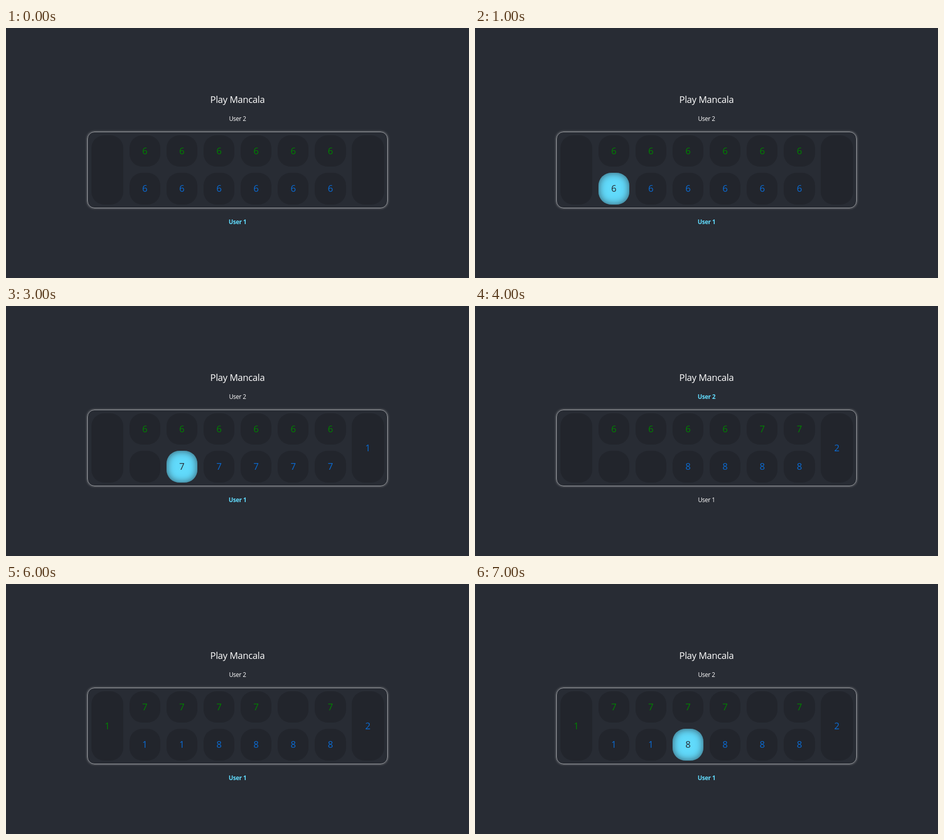
Animation of 900x487 px, one loop 8000 ms. Source, as an HTML page:

```html
<!DOCTYPE html>
<html lang="en">
<head>
<meta charset="utf-8">
<title>Mancala</title>
<style>
  html, body { margin: 0; width: 100%; height: 100%; overflow: hidden; background: #282c34; }
  body { position: relative; font-family: "Open Sans", "Noto Sans", sans-serif; letter-spacing: -.02em; color: #fff; }
  div { position: absolute; box-sizing: border-box; text-align: center; }
  .line { left: 0; width: 900px; height: 30px; line-height: 30px; font-size: 11.7px; }
  #title { top: 123.5px; font-size: 18px; }
  #user2 { top: 160.5px; }
  #user1 { top: 362px; }
  .line.active { color: #61dafb; font-weight: 700; }
  #board {
    left: 158px; top: 201.5px; width: 584px; height: 149.5px;
    border: 1.5px solid #a0a2a6; border-radius: 14px; box-shadow: 0 0 4px #8c8e92;
  }
  .pit { border-radius: 25px; background: #22252c; font-size: 18px; color: #0b6bd3; }
  .pit.top { color: #008000; }
  .pit.picked { background: #61dafb; color: #282c34; box-shadow: inset 0 0 15px rgba(40, 44, 52, .75); }
</style>
</head>
<body>
<div class="line" id="title">Play Mancala</div>
<div class="line" id="user2">User 2</div>
<div id="board"></div>
<div class="line" id="user1">User 1</div>
<script>
const STEP = 1000, STEPS = 8;
const MOVES = [0, 1, 8, 2];
const RIGHT_STORE = 6, LEFT_STORE = 13;

// Pits run counter-clockwise: lower row, right store, upper row, left store.
const pits = Array.from({ length: 14 }, (_, i) => {
  const pit = document.createElement("div");
  const isStore = i === RIGHT_STORE || i === LEFT_STORE;
  const column = i < 6 ? i : 12 - i;
  const x = i === RIGHT_STORE ? 672 : i === LEFT_STORE ? 165.5 : 239.5 + column * 72.15;
  const y = i < 6 ? 282 : 208.5;
  const height = isStore ? 135 : 61.5;
  pit.className = i > RIGHT_STORE ? "pit top" : "pit";
  pit.style.cssText = `left:${x}px;top:${y}px;width:${isStore ? 62.5 : 60.3}px;height:${height}px;line-height:${height}px`;
  document.body.append(pit);
  return pit;
});

// Replays the given number of moves from the opening position.
function play(count) {
  const stones = pits.map((_, i) => i === RIGHT_STORE || i === LEFT_STORE ? 0 : 6);
  let player = 1;
  for (const start of MOVES.slice(0, count)) {
    const hand = stones[start];
    stones[start] = 0;
    for (let k = 1; k <= hand; k++) stones[(start + k) % 14]++;
    const ownStore = player === 1 ? RIGHT_STORE : LEFT_STORE;
    if ((start + hand) % 14 !== ownStore) player = 3 - player;
  }
  return { stones, player };
}

let shown = -1;
function render(step) {
  const turn = Math.floor(step / 2);
  const { stones, player } = play(turn);
  const picked = step % 2 ? MOVES[turn] : -1;
  pits.forEach((pit, i) => {
    pit.textContent = stones[i] || "";
    pit.classList.toggle("picked", i === picked);
  });
  for (const n of [1, 2]) document.getElementById("user" + n).classList.toggle("active", n === player);
}

function tick() {
  const step = Math.floor(performance.now() / STEP) % STEPS;
  if (step !== shown) render(shown = step);
  requestAnimationFrame(tick);
}
tick();
</script>
</body>
</html>
```
